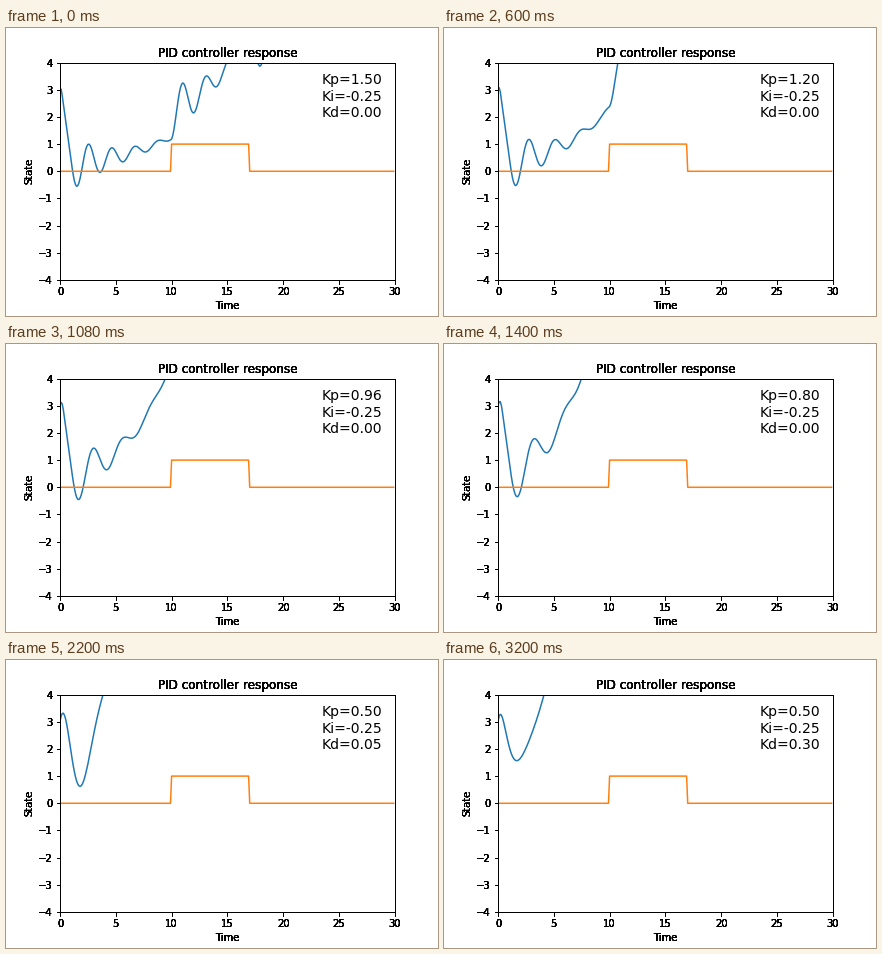
Recreate the animation shown at these times as a matplotlib script. Size 432 by 288 pixels, loop 5000 ms.

```python
import numpy as np
import matplotlib.pyplot as plt
from matplotlib.animation import FuncAnimation

DT = 0.1            # controller step
GAIN = 6.0          # force per unit of control output
DRAG = 0.4
MAX_SPEED = 3.0
KI = -0.25

FRAMES, INTERVAL = 250, 20
P_STEPS, D_STEPS = 100, 60

times = np.arange(300) * DT
target = np.where((times > 9.95) & (times < 16.95), 1.0, 0.0)


def gains(frame):
    """Kp falls first, then Kd rises, then both rest."""
    p = min(frame, P_STEPS)
    d = min(max(frame - P_STEPS, 0), D_STEPS)
    return 1.5 - 0.01 * p, 0.005 * d


def simulate(kp, kd):
    pos, vel, total = 3.0, 3.0, 0.0
    last = target[0] - pos
    path = []
    for goal in target:
        path.append(pos)
        err = goal - pos
        total += err * DT
        control = kp * err + KI * total + kd * (err - last) / DT
        last = err
        vel += (GAIN * control - DRAG * vel) * DT
        vel = min(max(vel, -MAX_SPEED), MAX_SPEED)
        pos += vel * DT
    return path


def overdraw(artist, count=6):
    """Paint an artist several times so its soft edges turn solid."""
    draw = artist.draw

    def repeat(renderer):
        for _ in range(count):
            draw(renderer)

    artist.draw = repeat


fig = plt.figure(figsize=(6, 4), dpi=72, facecolor="white")
ax = fig.add_axes([0.125, 0.125, 0.775, 0.755])
ax.set(xlim=(0, 30), ylim=(-4, 4), xlabel="Time", ylabel="State",
       title="PID controller response")
ax.set_xticks(range(0, 31, 5))
ax.set_yticks(range(-4, 5))

response, = ax.plot([], [], color="C0")
ax.plot(times, target, color="C1")
readout = ax.text(0.9623, 0.95, "", transform=ax.transAxes, fontsize=14,
                  ha="right", va="top")

for part in (ax.title, ax.xaxis.label, ax.yaxis.label, *ax.spines.values()):
    overdraw(part)
for tick in ax.xaxis.get_major_ticks() + ax.yaxis.get_major_ticks():
    overdraw(tick.label1)
    overdraw(tick.tick1line)


def update(frame):
    kp, kd = gains(frame)
    response.set_data(times, simulate(kp, kd))
    readout.set_text(f"Kp={kp:.2f}\nKi={KI:.2f}\nKd={kd:.2f}")
    return response, readout


anim = FuncAnimation(fig, update, frames=FRAMES, interval=INTERVAL,
                     repeat=True, repeat_delay=0, blit=False)
plt.show()
```
